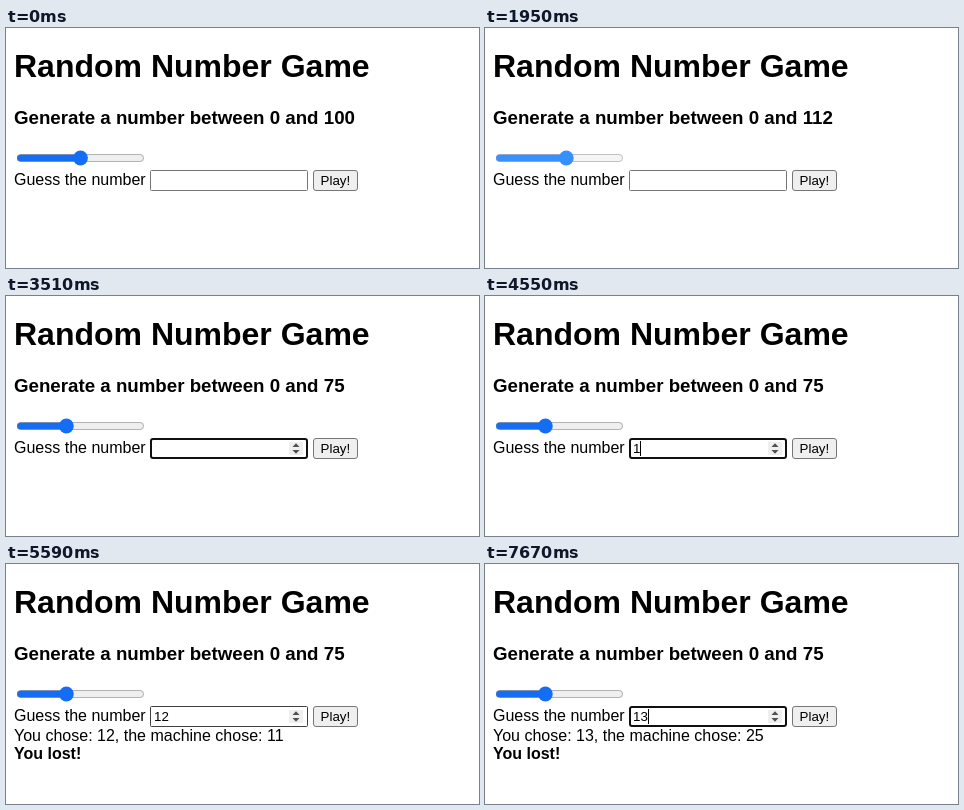
An HTML page for the animation above (8000 ms loop, 473 by 240 pixels).

```html
<!DOCTYPE html>
<html lang="en">
<head>
<meta charset="utf-8">
<title>Random Number Game</title>
<style>
  html, body { margin: 0; width: 100%; height: 100%; overflow: hidden; background: #fff; }
  svg { display: block; width: 473px; height: 240px; font: 16px "Liberation Sans", Arial, sans-serif; }
  .small { font-size: 13.333px; }
  .bold { font-weight: bold; }
</style>
</head>
<body>
<svg viewBox="0 0 473 240">
  <text class="bold" x="8" y="49" font-size="32">Random Number Game</text>
  <text class="bold" x="8" y="96" font-size="18.72" id="range"></text>

  <g id="slider">
    <rect id="track" x="11" y="126" width="127" height="8" rx="4"/>
    <rect id="fill" x="11" y="126.5" height="7" rx="3.5"/>
    <rect id="edge" x="11.5" y="126.5" width="126" height="7" rx="3.5" fill="none" stroke-opacity=".5"/>
    <circle id="thumb" cy="130" r="7.4"/>
  </g>

  <text x="8" y="157">Guess the number</text>
  <rect id="field" fill="#fff"/>
  <g id="spinner">
    <rect x="283" y="146" width="14" height="13" fill="#efefef"/>
    <path d="M286.5 151 L290 147.2 L293.5 151Z M286.5 154 L290 157.8 L293.5 154Z" fill="#505050"/>
  </g>
  <text class="small" x="148" y="157" id="guess"></text>
  <path id="caret" stroke="#000"/>

  <rect x="307.5" y="142.5" width="44" height="20" rx="2.5" fill="#efefef" stroke="#767676"/>
  <text class="small" x="314.6" y="157">Play!</text>

  <g id="result">
    <text x="8" y="177" id="chosen"></text>
    <text class="bold" x="8" y="195">You lost!</text>
  </g>
</svg>
<script>
const LOOP = 8000;
const $ = id => document.getElementById(id);
const set = (id, attrs) => {
  for (const k in attrs) $(id).setAttribute(k, attrs[k]);
};
const show = (id, on) => set(id, { visibility: on ? 'visible' : 'hidden' });

// accent, track and border colours of the slider
const looks = {
  idle:  ['#146ef5', '#efefef', '#767676'],
  hover: ['#0d5dcb', '#e5e5e5', '#4f4f4f'],
  drag:  ['#3790ff', '#f5f5f5', '#8d8d8d']
};

// each step changes only the listed parts of the state
const start = { max: 100, look: 'idle', spin: false, focus: false, caret: false, guess: '', pair: null };
const steps = [
  [520, { look: 'hover' }],
  [1170, { look: 'drag' }],
  [1300, { max: 104 }],
  [1430, { max: 110 }],
  [1560, { max: 116 }],
  [1690, { max: 114 }],
  [1950, { max: 112 }],
  [2080, { max: 102 }],
  [2210, { max: 89 }],
  [2340, { max: 79 }],
  [2470, { max: 75 }],
  [2600, { look: 'idle', spin: true }],
  [2860, { focus: true, caret: true }],
  [3510, { caret: false }],
  [4030, { caret: true }],
  [4550, { guess: '1' }],
  [4680, { guess: '12' }],
  [5200, { pair: [12, 11] }],
  [5590, { focus: false, caret: false }],
  [6240, { focus: true, caret: true }],
  [6890, { caret: false }],
  [7410, { caret: true, guess: '1' }],
  [7540, { guess: '13' }],
  [7670, { pair: [13, 25] }]
];

function draw(s) {
  const [accent, track, border] = looks[s.look];
  const x = 18 + s.max / 200 * 113;
  $('range').textContent = `Generate a number between 0 and ${s.max}`;
  set('track', { fill: track });
  set('fill', { fill: accent, width: x - 11 });
  set('edge', { stroke: border });
  set('thumb', { fill: accent, cx: x });

  set('field', s.focus
    ? { x: 145, y: 143, width: 156, height: 19, rx: 2, stroke: '#101010', 'stroke-width': 2 }
    : { x: 144.5, y: 142.5, width: 157, height: 20, rx: 1, stroke: s.spin ? '#404040' : '#767676', 'stroke-width': 1 });
  show('spinner', s.spin);
  $('guess').textContent = s.guess;
  const cx = Math.round(148 + 7.415 * s.guess.length) + 0.5;
  set('caret', { d: `M${cx} 145V160` });
  show('caret', s.caret);

  show('result', s.pair);
  if (s.pair) $('chosen').textContent = `You chose: ${s.pair[0]}, the machine chose: ${s.pair[1]}`;
}

const t0 = performance.now();
let shown = -1;
function tick() {
  const t = Math.max(0, performance.now() - t0) % LOOP;
  const past = steps.filter(([at]) => at <= t);
  if (past.length !== shown) {
    shown = past.length;
    draw(Object.assign({}, start, ...past.map(step => step[1])));
  }
  requestAnimationFrame(tick);
}
tick();
</script>
</body>
</html>
```
